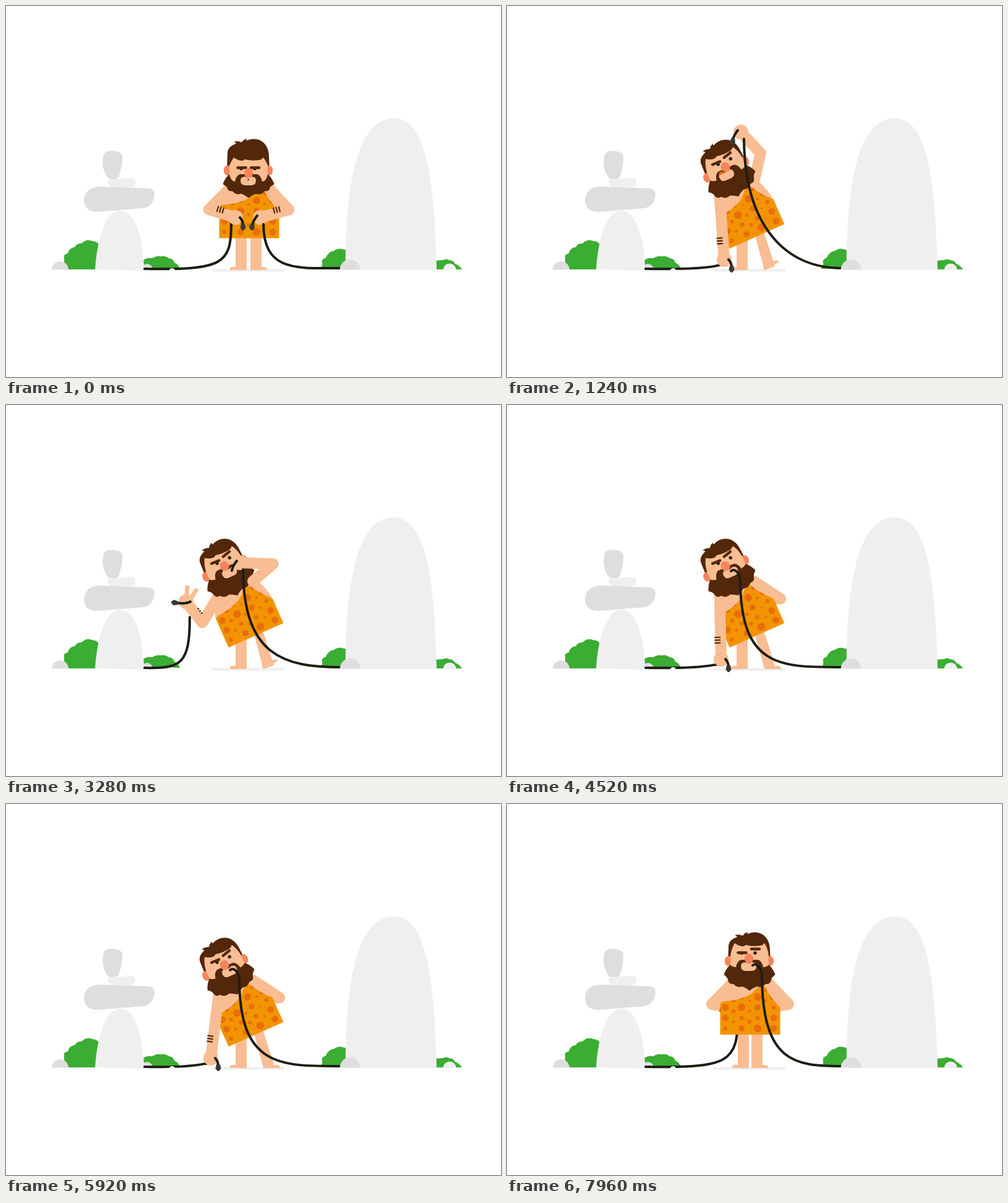
An HTML page with a canvas for the animation above (8 s loop, 800 px wide and 600 px high).

```html
<!DOCTYPE html>
<html lang="en">
<head>
<meta charset="utf-8">
<title>Caveman with cables</title>
<style>
html, body { margin: 0; height: 100%; overflow: hidden; background: #fff; }
canvas { display: block; width: 100vw; height: 100vh; object-fit: contain; }
</style>
</head>
<body>
<canvas id="stage" width="800" height="600"></canvas>
<script>
const LOOP = 8000, STEP = 40, GROUND = 425, HALF_ARM = 47;
const SKIN = '#f8bd93', HAIR = '#53270a', PINK = '#f5845c', CABLE = '#1d1d14', CLAMP = '#373b30';
const PALE = '#efefef', GREY = '#dedede', GREEN = '#3aad32', TUNIC = '#f29400', SPOT = '#ea6d0b';
const ctx = document.getElementById('stage').getContext('2d');

const clamp = (v, lo, hi) => Math.min(hi, Math.max(lo, v));
const add = ([x, y], dx, dy) => [x + dx, y + dy];
const mix = (a, b, u) => a.map((v, i) => v + (b[i] - v) * u);

function ramp(t, from, to) {
  const u = clamp((t - from) / (to - from), 0, 1);
  return u * u * (3 - 2 * u);
}

// Eases a point through a chain of moves: [from, to, point].
function follow(t, point, ...moves) {
  return moves.reduce((p, [from, to, target]) => mix(p, target, ramp(t, from, to)), point);
}

function fill(color, d) {
  ctx.fillStyle = color;
  ctx.fill(new Path2D(d));
}

function line(color, width, d, cap = 'round') {
  Object.assign(ctx, { strokeStyle: color, lineWidth: width, lineCap: cap, lineJoin: 'round' });
  ctx.stroke(new Path2D(d));
}

const curve = (a, b, c, d) => line(CABLE, 4, `M${a}C${b} ${c} ${d}`);

function oval(color, x, y, rx, ry = rx) {
  ctx.fillStyle = color;
  ctx.beginPath();
  ctx.ellipse(x, y, rx, ry, 0, 0, Math.PI * 2);
  ctx.fill();
}

function dome(color, x, y, r) {
  fill(color, `M${x - r} ${y}A${r} ${r} 0 0 1 ${x + r} ${y}Z`);
}

function at(x, y, angle, part) {
  ctx.save();
  ctx.translate(x, y);
  ctx.rotate(angle);
  part();
  ctx.restore();
}

function scenery() {
  fill(GREEN, 'M94 426V407Q92 402 100 400Q102 391 111 390Q115 383 122 384Q130 376 139 380Q146 380 151 386V426Z');
  fill(GREEN, 'M222 411Q228 406 236 408Q243 403 250 405Q257 403 263 408Q270 408 272 415Q279 418 281 425H222Z');
  fill(GREEN, 'M507 425Q512 420 511 417Q509 409 517 407Q521 397 530 396Q536 391 543 393L551 395V425Z');
  fill(GREEN, 'M694 412Q703 411 706 411Q712 408 716 411Q723 411 726 417Q732 419 737 426H694Z');
  dome(GREY, 87.5, 426.5, 13.5);
  dome(GREY, 228, 426, 9);
  fill(PALE, 'M144 426C147 375 162 331 184 331C208 331 221 370 223.5 428Z');
  fill(GREY, 'M158 240Q160 234 172 234Q186 235 188 242C189 255 185 268 182 277Q180 280 175 280H168Q164 279 160 270C156 262 155 250 158 240Z');
  fill(PALE, 'M167 281L200 278Q209 277 209 285Q209 293 200 293L172 294Q164 288 164 285Q164 281 167 281Z');
  fill(GREY, 'M152 292L232 295Q240 297 240 305Q238 324 222 327L148 333Q126 333 126 313Q128 293 152 292Z');
  fill(PALE, 'M548.5 427C549 330 556 182 627 181.5C686 182 692 310 696 427Z');
  dome(PALE, 717, 427, 10.5);
  line('#eee', 4, 'M335 427.5H448');
}

function legs(t, lean, down) {
  const left = 373 - 2 * Math.max(lean, down);
  fill(SKIN, `M${left} 368h18V427h-27q-1 -5 4 -5h5Z`);
  const top = 395 + 5 * lean, heel = 395 + 21 * lean;
  fill(SKIN, `M${top} 368h${18 - 2 * lean}L${heel + 18 - lean} ${424 - 3 * lean}L${heel} 427Z`);
  const tap = t < 3900 ? Math.max(0, Math.cos((t - 1240) / 510 * Math.PI * 2)) : 0;
  at(heel, 427, -tap * lean * 0.5, () => fill(SKIN, 'M0 0V-5H22Q27 -5 27 0Z'));
}

// The elbow sits off the middle of the arm, further out the more it folds.
function elbowOf(shoulder, hand, outX, outY) {
  const half = Math.hypot(hand[0] - shoulder[0], hand[1] - shoulder[1]) / 2;
  const fold = Math.sqrt(Math.max(0, HALF_ARM ** 2 - half ** 2));
  return add(mix(shoulder, hand, 0.5), outX * fold, outY * fold);
}

const droop = (shoulder, hand) => clamp((hand[1] - shoulder[1]) / 100, -0.3, 0.3);

function arm(shoulder, elbow, hand, side, stripe) {
  line(SKIN, 18, `M${shoulder}L${elbow}L${hand}`);
  oval(SKIN, ...hand, 12);
  if (!side) return;
  const angle = Math.atan2(hand[1] - elbow[1], hand[0] - elbow[0]);
  at(...mix(elbow, hand, 0.4), angle, () => {
    for (const x of [-4.5, 0, 4.5]) line(HAIR, 2.2, `M${x} ${-side * (9 - stripe)}V${-side * 9}`);
  });
}

function plug(root, a, b, tip, withClamp) {
  curve(root, a, b, tip);
  if (!withClamp) return;
  at(...tip, Math.atan2(tip[1] - b[1], tip[0] - b[0]),
    () => fill(CLAMP, 'M-3 -3L4 -4.5L8 -1V1L4 4.5L-3 3Z'));
}

function torso() {
  const tunic = 'M344.5 373V325Q345 320 351 319C375 317 392 312 402 300Q406 295 411 295H417Q424 312 441.5 329V373Z';
  fill(SKIN, 'M356 284L344 323L360 345L441 332Q442 314 427 284Z');
  fill(TUNIC, tunic);
  ctx.save();
  ctx.clip(new Path2D(tunic));
  for (let row = 0; row < 4; row++) {
    for (let col = 0; col < 4; col++) {
      const x = 353 + 26 * col, y = 363 - 17 * row;
      oval(SPOT, x, y, 4.8 + 1.5 * Math.sin(row * 4 + col * 1.3 - 1.2));
      oval(SPOT, x + 13, y - 11, 2.4 + 0.7 * Math.sin(row + col * 2));
    }
  }
  ctx.restore();
}

function brow(x, y, angle) {
  at(x, y, angle, () => line(HAIR, 4.4, 'M-6.5 0H6.5'));
}

function head({ lean, down, smirk, thinking }) {
  const mid = 9.5 * down, low = 17.5 * down, chin = 6 * down;
  at(0, 5 * down, 0, () => fill(HAIR,
    'M357 258L358 231C358 222 364 218 372 215Q370 212 368 212Q375 210 381 213Q384 208 390 207Q387 209 389 210Q394 207.5 400 207.5C416 207.5 425 220 425 236L426 258Z'));
  for (const x of [358, 425]) oval(PINK, x, 254 + mid, 6.2, 8);
  fill(SKIN, `M361 ${246 + mid}Q363 ${233 + low} 368 ${225 + low}Q376 ${231 + low} 383 ${230 + low}` +
    `L386 ${228 + low}Q396 ${231 + low} 410 ${229 + low}Q414 ${228 + low} 416 ${225 + low}` +
    `Q422 ${234 + low} 423 ${246 + mid}V${275 + mid}H361Z`);
  // Half of the beard, drawn again as its mirror image.
  const half = `M0 ${252 + low}H14Q20 ${254 + low} 22 ${264 + low}Q29 ${263 + low} 31 ${260 + mid}` +
    `L35 ${264 + mid}Q40 ${271 + mid} 41.5 ${276 + mid}Q36 ${280 + mid} 35 ${284 + chin}` +
    `Q34 ${292 + chin} 26 ${291 + chin}Q20 ${298 + chin} 12 ${295 + chin}Q6 ${297 + chin} 0 ${302 + chin}Z`;
  for (const flip of [1, -1]) {
    ctx.save();
    ctx.translate(392, 0);
    ctx.scale(flip, 1);
    fill(HAIR, half + `M-1 ${252 + low}H1V${301 + chin}H-1Z`);
    ctx.restore();
  }
  at(lean * (4 - 7 * thinking) - smirk, low, 0, () => {
    fill(SKIN, 'M379 262Q379 256 386 256Q391.5 259 397 256Q404 256 404 262Q404 270 396 270H387Q379 270 379 262Z');
    if (down > 0.5) oval(CABLE, 391.5, 261, 1.2);
  });
  at(0, low, 0, () => {
    oval(SPOT, 382, 256, 4 * thinking, 2.4 * thinking);
    for (const x of [380, 402]) oval(CABLE, x + 3 * lean - smirk, 241 + 2 * down, 2.7);
    brow(381 - smirk, 239.5 + 2 * down - 1.5 * lean + smirk, 0.04 * lean);
    brow(402.5 - smirk, 239.5 + 2 * down - 6 * lean - 5 * smirk, -0.26 * lean);
    oval(PINK, 392 - smirk, 250, 7.2, 8);
  });
}

function draw(t) {
  const lean = ramp(t, 160, 560) - ramp(t, 6020, 6440);
  const down = 1 - ramp(t, 160, 560);
  const thinking = ramp(t, 160, 560) - ramp(t, 1760, 2200);
  const raised = ramp(t, 1760, 2240) - ramp(t, 3400, 3840);
  const plugged = ramp(t, 3400, 3640);
  const smirk = ramp(t, 7480, 7680);

  const place = new DOMMatrix()
    .translate(393 + 11 * lean, 373 + 2.5 * down - 0.5 * lean).rotate(-24 * lean).translate(-393, -373);
  const onBody = (x, y) => {
    const p = place.transformPoint({ x, y });
    return [p.x, p.y];
  };
  const inBody = part => {
    ctx.save();
    const m = place;
    ctx.transform(m.a, m.b, m.c, m.d, m.e, m.f);
    part();
    ctx.restore();
  };

  const leftHand = follow(t, [371, 342], [160, 600, [351, 410]], [1760, 2240, [291, 318]],
    [3400, 3840, [346, 411]], [4640, 5120, [331, 411]], [6000, 6440, [380, 333]]);
  const rightHand = follow(t, [411, 342], [160, 600, [378, 204]], [1760, 2240, [378, 255]],
    [3400, 3660, [396, 212]], [3700, 4080, [396, 315]], [6020, 6440, [404, 332]]);
  if (t > 600 && t < 1760) rightHand[0] += 2 * Math.sin((t - 1240) / 320 * Math.PI * 2);

  const leftArm = () => {
    const shoulder = onBody(364, 290);
    const elbow = elbowOf(shoulder, leftHand, raised - 1, droop(shoulder, leftHand) * (1 - raised) + raised);
    const end = add(leftHand, -7 + 13 * raised, 9 + 16 * raised);
    curve([224, GROUND], [end[0] - 13, 427], [end[0], 418], end);
    arm(shoulder, elbow, leftHand, 2 * down - 1, 8 - 7 * raised);
    if (raised > 0.05) {
      line(SKIN, 7, `M${leftHand}l${2 * raised} ${-23 * raised}M${add(leftHand, 4, 0)}l${12 * raised} ${-18 * raised}`);
    }
    const root = add(leftHand, 7, 0), tip = add(leftHand, 12 - 28 * raised, 13 - 11 * raised);
    plug(root, add(root, 3 - 8 * raised, 3), add(tip, 8 * raised, -6 + 7 * raised), tip, true);
  };
  const rightArm = () => {
    const shoulder = onBody(424, 291);
    arm(shoulder, elbowOf(shoulder, rightHand, 1, droop(shoulder, rightHand)), rightHand, down > 0.5 ? -1 : 0, 8);
  };
  const rightCable = () => {
    const mouth = onBody(397, 261);
    const start = mix(add(rightHand, 5, 11), add(mouth, 15, 18), plugged);
    const root = mix(add(rightHand, -5, -3), start, plugged);
    const tip = mix(add(rightHand, -13, 13), mouth, plugged);
    curve(start, add(start, 1, Math.min(140, 430 - start[1])),
      [start[0] + (541 - start[0]) * 0.42, 424], [541, 424]);
    plug(root, add(root, -4 + 4 * plugged, 5 - 21 * plugged), add(tip, 1 + 4 * plugged, -7 + 2 * plugged), tip, t < 2160);
  };
  const leftHidden = t > 6240, rightHidden = t > 3880, overHead = t > 1960 && !rightHidden;

  ctx.fillStyle = '#fff';
  ctx.fillRect(0, 0, 800, 600);
  scenery();
  legs(t, lean, down);
  if (leftHidden) leftArm();
  if (rightHidden) rightArm();
  inBody(torso);
  if (!leftHidden) leftArm();
  if (!rightHidden && !overHead) rightArm();
  inBody(() => head({ lean, down, smirk, thinking }));
  if (overHead) rightArm();
  rightCable();
  dome(GREY, 556, 426.5, 16.5);
  dome('#f6f6f6', 268.5, 429, 5);
}

const start = performance.now();
function tick() {
  const t = (performance.now() - start) % LOOP;
  draw(Math.floor(t / STEP) * STEP);
  requestAnimationFrame(tick);
}
tick();
</script>
</body>
</html>
```
